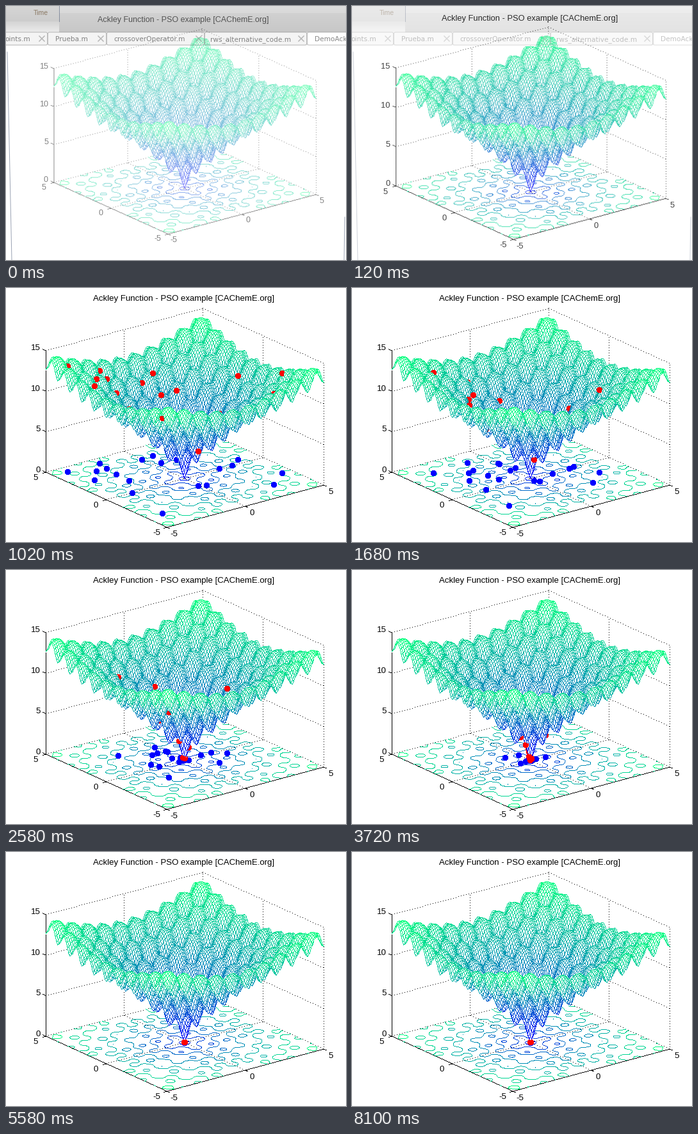
Recreate the animation shown at these times as a matplotlib script. Size 531 by 397 pixels, loop 8880 ms.

```python
import numpy as np
import matplotlib.pyplot as plt
from matplotlib.animation import FuncAnimation
from matplotlib.patches import FancyBboxPatch

W, H, DPI = 531, 397, 64
PX = 72 / DPI                      # points per pixel
FRAMES, STEP_MS = 148, 60
ORIGIN = np.array([279, 298])
AXES = np.array([[24.5, -6.6], [-18.9, -8.6], [0, -12.67]])
DEPTH = (-0.53, -0.69, 0.33)       # grows towards the viewer
WINTER = plt.get_cmap("winter")
BLACK, RED, BLUE = (0, 0, 0), (1, 0, 0), (0, 0, 1)

plt.rcParams["font.family"] = "Liberation Sans"


def ackley(x, y):
    bowl = 20 - 20 * np.exp(-0.2 * np.sqrt((x**2 + y**2) / 2))
    waves = np.exp((np.cos(2 * np.pi * x) + np.cos(2 * np.pi * y)) / 2)
    return bowl + np.e - waves


def project(x, y, z=0.0):
    return [ORIGIN[i] + x * AXES[0, i] + y * AXES[1, i] + z * AXES[2, i]
            for i in (0, 1)]


def depth(x, y, z):
    return DEPTH[0] * x + DEPTH[1] * y + DEPTH[2] * z


def sample(count):
    x, y = np.meshgrid(np.linspace(-5, 5, count), np.linspace(-5, 5, count))
    return x, y, ackley(x, y)


def trace(a, b):
    """Walk each segment a-b in steps of one pixel along its longer side."""
    steps = np.maximum(np.ceil(np.abs(b - a)[:, :2].max(axis=1)), 1)
    walk = np.arange(int(steps.max()) + 1)
    t = np.minimum(walk / steps[:, None], 1)[..., None]
    return (a[:, None] + t * (b - a)[:, None]).reshape(-1, a.shape[1])


def pixels(points):
    return points[:, 1].astype(int), points[:, 0].astype(int)


def draw_line(image, p, q, every=1):
    points = trace(np.array([project(*p)]), np.array([project(*q)]))
    image[pixels(points[::every])] = BLACK


def draw_box(image):
    def dotted(p, q):
        draw_line(image, p, q, every=4)

    for z in (0, 5, 10, 15):
        dotted((-5, 5, z), (5, 5, z))
        dotted((5, 5, z), (5, -5, z))
        draw_line(image, (-5, 5, z), (-5, 5.25, z))
    for v in (0, 5):
        dotted((v, 5, 0), (v, 5, 15))
        dotted((5, -v, 0), (5, -v, 15))
    dotted((0, -5, 0), (0, 5, 0))
    dotted((-5, 0, 0), (5, 0, 0))
    for end in ((-5, 5, 15), (-5, -5, 0)):
        draw_line(image, (-5, 5, 0), end)
    draw_line(image, (-5, -5, 0), (5, -5, 0))
    for v in (-5, 0, 5):
        draw_line(image, (v, -5, 0), (v, -5.22, 0))
        draw_line(image, (-5, v, 0), (-5.2, v, 0))


def draw_contours(image, stage, x, y, z):
    levels = np.arange(2, 15, 2)
    contours = stage.contour(*project(x, y), z, levels=levels)
    for level, lines in zip(levels, contours.allsegs):
        for line in lines:
            color = WINTER(level / z.max())[:3]
            image[pixels(trace(line[:-1], line[1:]))] = color
    contours.remove()


def depth_buffer():
    x, y, z = sample(1201)
    col, row = project(x, y, z)
    buf = np.full((H, W), -np.inf)
    index = row.astype(int) * W + col.astype(int)
    np.maximum.at(buf.ravel(), index.ravel(), depth(x, y, z).ravel())
    return buf


def draw_mesh(buf, x, y, z):
    """White surface with hidden lines removed, and the mask it covers."""
    image, mask = np.ones((H, W, 3)), np.isfinite(buf)
    nodes = np.stack([*project(x, y, z), z, depth(x, y, z)], axis=-1)
    a = np.concatenate([nodes[:-1].reshape(-1, 4),
                        nodes[:, :-1].reshape(-1, 4)])
    b = np.concatenate([nodes[1:].reshape(-1, 4),
                        nodes[:, 1:].reshape(-1, 4)])
    points = trace(a, b)
    points = points[points[:, 3] >= buf[pixels(points)] - 0.15]
    image[pixels(points)] = WINTER(points[:, 2] / z.max())[:, :3]
    mask[pixels(points)] = True
    return image, mask


def first_places():
    """Lone particles, pairs side by side and two slanting columns."""
    lone = [(-4.7, 5), (-4.6, -3.9), (3.6, -3.9),
            (4.85, -2.9), (4.3, 1.1), (-4.05, 0.1)]
    pairs = [(x + dx, y) for x, y in
             ((0.4, -1.9), (3.25, 0.1), (1.4, 3.0), (0.9, 4.1))
             for dx in (-0.45, 0.45)]
    column = [(-2.9, 2.1 + i) for i in range(3)]
    slant = [(-4.2 + 0.8 * i, 3.1 + i * 0.95) for i in range(3)]
    return np.array(lone + pairs + column + slant)


START = first_places()
PHASE = np.random.default_rng(4).uniform(0, 2 * np.pi, START.shape)


def swarm(n):
    """Each coordinate homes at one capped speed, with a fading wobble."""
    travel = 0.075 * n * n / (n + 1.5)
    pos = np.sign(START) * np.maximum(np.abs(START) - travel, 0)
    wobble = 0.3 * np.exp(-n / 28) * min(n / 20, 1)
    return pos + wobble * np.sin(0.3 * n + PHASE)


DISC = np.array([(r, c) for r in range(-5, 6) for c in range(-5, 6)
                 if r * r + c * c <= 22])


def stamp(image, x, y, z, color, buf=None):
    col, row = project(x, y, z)
    for r, c, d in zip(row.astype(int), col.astype(int), depth(x, y, z)):
        rows, cols = (DISC + (r, c)).T
        if buf is not None:
            seen = d + 0.2 >= buf[rows, cols]
            rows, cols = rows[seen], cols[seen]
        image[rows, cols] = color


def compose(pos=None):
    image = floor.copy()
    if pos is not None:
        x, y = pos.T
        stamp(image, x, y, 0 * x, BLUE)
    image[covered] = mesh[covered]
    if pos is not None:
        stamp(image, x, y, ackley(x, y), RED, zbuf)
    return image


fig = plt.figure(figsize=(W / DPI, H / DPI), dpi=DPI, facecolor="white")


def add_stage():
    stage = fig.add_axes([0, 0, 1, 1])
    stage.axis("off")
    return stage


def show(stage, image):
    return stage.imshow(image, extent=(0, W, H, 0), aspect="auto",
                        interpolation="nearest")


ax = add_stage()
grid = sample(101)
zbuf = depth_buffer()
mesh, covered = draw_mesh(zbuf, *grid)
floor = np.ones((H, W, 3))
draw_box(floor)
draw_contours(floor, ax, *grid)
plot = show(ax, compose())

FONT = 13.25
labels = [ax.text(277.5, 17, "Ackley Function - PSO example [CAChemE.org]",
                  ha="center", va="center")]
for z in (0, 5, 10, 15):
    labels.append(ax.text(53.5, project(-5, 5, z)[1] - 3.5, str(z),
                          ha="right", va="center"))
for v in (-5, 0, 5):
    for (x, y), (dx, dy) in ((project(v, -5), (11, 11)),
                             (project(-5, v), (-16, 9))):
        labels.append(ax.text(x + dx, y + dy, str(v),
                              ha="center", va="center"))

# Desktop that shines through while the window opens.
desk = add_stage()


def desktop_image():
    image = np.ones((H, W, 3))
    image[:41] = np.linspace(0.68, 0.58, 41)[:, None, None]
    image[24:41, :83] = np.linspace(0.68, 0.85, 17)[:, None, None]
    image[:11, 83:] += 0.06
    image[41:62, :471] = 0.92
    return image


INK, EDGE = "0.1", "0.5"
ghosts = [show(desk, desktop_image())]
tabs = ((-20, 65, -2, "oints.m"), (65, 157, 77, "Prueba.m"),
        (157, 310, 168, "crossoverOperator.m"),
        (310, 470, 319, "rws_alternative_code.m"),
        (470, 580, 482, "DemoAckley.m"))
for left, right, x, name in tabs:
    tab = FancyBboxPatch((left + 3, 44), right - left - 6, 14, fill=False,
                         boxstyle="round,pad=3", ec=EDGE, lw=PX)
    ghosts.append(desk.add_patch(tab))
    ghosts.append(desk.text(x, 55, name, fontsize=10.45 * PX, color=INK,
                            family="DejaVu Sans", clip_on=True))
    cross = right - 9
    ghosts += desk.plot([cross - 4, cross + 4, np.nan, cross - 4, cross + 4],
                        [47, 55, np.nan, 55, 47], color=EDGE, lw=1.5 * PX)
ghosts.append(desk.text(43, 14, "Time", color="#4a2800", fontsize=10.5 * PX))
for xs, ys in (([83, 83], [0, 24]), ([2, 9], [72, H]), ([529, 528], [330, H])):
    ghosts += desk.plot(xs, ys, color="#405070", lw=PX)
desk.set(xlim=(0, W), ylim=(H, 0))

OPENING = 4


def zoom(p):
    sx, sy = 0.942 + 0.058 * p, 0.935 + 0.065 * p
    cx, cy = 269, 98
    ax.set_xlim(cx - cx / sx, cx + (W - cx) / sx)
    ax.set_ylim(cy + (H - cy) / sy, cy - cy / sy)
    plot.set_interpolation("nearest" if p == 1 else "bilinear")
    for label in labels:
        label.set_fontsize(FONT * PX * sx)


def update(k):
    p = min(k / OPENING, 1)
    zoom(p)
    desk.set_visible(p < 1)
    for ghost in ghosts:
        ghost.set_alpha(0.52 * (1 - p))
    step = min(max(k - 8, 0), 127)
    plot.set_data(compose(swarm(step) if p == 1 else None))
    return []


anim = FuncAnimation(fig, update, frames=FRAMES, interval=STEP_MS,
                     init_func=lambda: update(0), repeat=True, repeat_delay=0)
plt.show()
```
